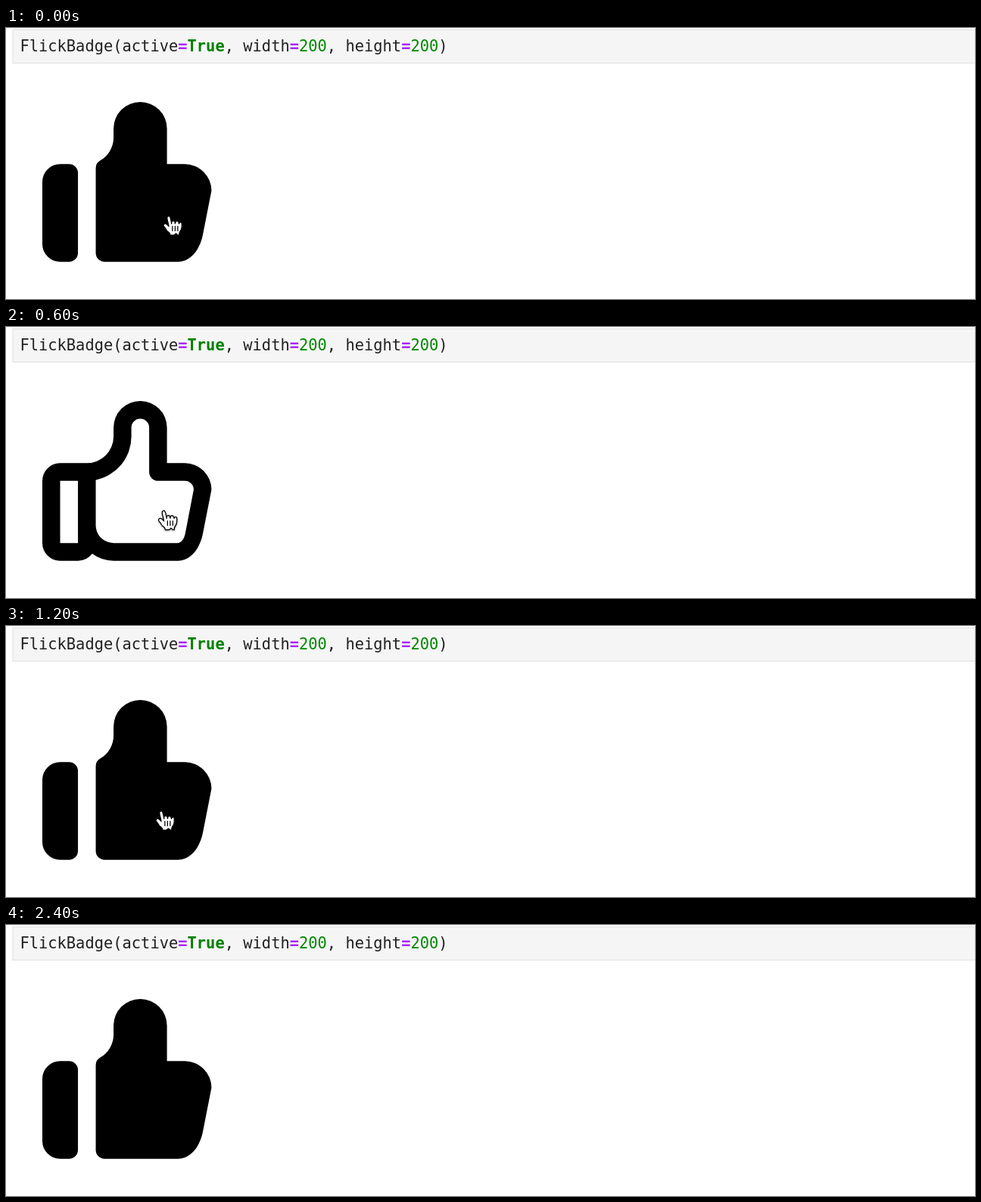
An HTML page that plays this animation: 1280x359 px, repeating every 2700 ms.

```html
<!DOCTYPE html>
<html lang="en">
<head>
<meta charset="utf-8">
<title>Icon toggle</title>
<style>
  html, body { margin: 0; width: 100%; height: 100%; overflow: hidden; background: #fff; }
  svg { display: block; width: 100%; height: 100%; }
  text { font: 20.41px "DejaVu Sans Mono", monospace; fill: #212121; white-space: pre; }
  .op { fill: #a2f; font-weight: bold; }
  .key { fill: #008000; font-weight: bold; }
  .num { fill: #080; }
  #cursor { filter: drop-shadow(0 1.5px 1.2px rgba(0, 0, 0, .45)); }
</style>
</head>
<body>
<svg viewBox="0 0 1280 359">
  <rect x="9" y="2.5" width="1290" height="44" fill="#f5f5f5" stroke="#e0e0e0"/>
  <text x="18.4" y="31">FlickBadge(active<tspan class="op">=</tspan><tspan class="key">True</tspan>, width<tspan class="op">=</tspan><tspan class="num">200</tspan>, height<tspan class="op">=</tspan><tspan class="num">200</tspan>)</text>

  <!-- Icons are drawn on a 19 by 18 unit grid -->
  <g transform="translate(48 98) scale(11.76)">
    <path id="solid" d="M2 7H3a1 1 0 0 1 1 1V17a1 1 0 0 1-1 1H2a2 2 0 0 1-2-2V9a2 2 0 0 1 2-2z
      M8 3a3 3 0 0 1 6 0V7H16a3 3 0 0 1 3 3L18 15.1C17.65 16.7 16.6 18 15.25 18H7a1 1 0 0 1-1-1V7.46a1 1 0 0 1 .5-.86A3 3 0 0 0 8 4z"/>
    <path id="outline" fill-rule="evenodd" d="M8 3a3 3 0 0 1 6 0V7H16a3 3 0 0 1 3 3L18 15.1C17.65 16.7 16.6 18 15.25 18H8a4 4 0 0 1-2.4-.8A2 2 0 0 1 4 18H2a2 2 0 0 1-2-2V9a2 2 0 0 1 2-2H5A3 3 0 0 0 8 4z
      M10 3a1 1 0 0 1 2 0V8a1 1 0 0 0 1 1H16a1 1 0 0 1 1 1L16.05 14.95C15.9 15.6 15.6 16 15.15 16H8a2 2 0 0 1-2-2V8.9A5 5 0 0 0 10 4z
      M2 9H4V16H2z"/>
  </g>

  <g id="cursor">
    <g transform="scale(1.67)" stroke="#000" stroke-width=".75" stroke-linejoin="round" stroke-linecap="round">
      <path fill="#fff" d="M11.3 20.4C11 20 10.7 19.3 10.1 18.4L8.6 16.5C8 15.3 9 14.4 9.9 14.4
        C10.9 14.5 11.6 15.5 12.6 16.6C12.4 15 11.9 13.4 11.6 12L11.3 10.5C11.1 8.9 11.9 8.3 12.9 8.5
        C14 9 14.3 11.2 14.8 14.6C14.7 13 15 12.2 16.4 12.2C17.4 12.4 17.6 13.3 17.6 14.5
        C17.7 12.9 18.1 12.4 19.1 12.3C20.4 12.4 20.5 13.2 20.7 14.6C21 13 22.9 13.1 22.9 14.5
        V16.8C22.8 18.5 22.6 19.2 22 19.9C20.7 21.4 20.6 21.8 20.8 23.6C19.6 23.8 19.3 23.4 18.6 22.5
        Q18.2 22 17.9 22.5C17.1 23.7 17 23.6 13.7 23.6Q13.9 22.4 12.4 21.1z"/>
      <path fill="none" d="M15.5 16.6V20.2M17.6 16.6V20.2M19.7 16.6V20.2"/>
    </g>
  </g>
</svg>
<script>
  const LOOP = 2700, STEP = 100;
  const RELEASE = 400, PRESS = 1200, LEAVE = 2200;
  const solid = document.getElementById("solid");
  const outline = document.getElementById("outline");
  const cursor = document.getElementById("cursor");

  // Pointer path: time, x, y
  const path = [
    [0, 194, 235], [300, 189.5, 230], [400, 189, 229.5], [500, 189, 229.5],
    [900, 183, 228.5], [1200, 184, 231], [1600, 184, 231],
    [1700, 183, 230], [2100, 185, 243]
  ];

  function pointAt(t) {
    const next = path.findIndex(p => p[0] > t);
    if (next < 0) return path[path.length - 1].slice(1);
    const [t0, x0, y0] = path[next - 1], [t1, x1, y1] = path[next];
    const k = (t - t0) / (t1 - t0);
    return [x0 + (x1 - x0) * k, y0 + (y1 - y0) * k];
  }

  function show(el, visible) {
    el.setAttribute("visibility", visible ? "visible" : "hidden");
  }

  function draw(now) {
    const t = Math.floor((now % LOOP) / STEP) * STEP;
    const open = t >= RELEASE && t < PRESS;
    show(solid, !open);
    show(outline, open);
    show(cursor, t < LEAVE);
    cursor.setAttribute("transform", `translate(${pointAt(t)})`);
    requestAnimationFrame(draw);
  }
  draw(0);
</script>
</body>
</html>
```
